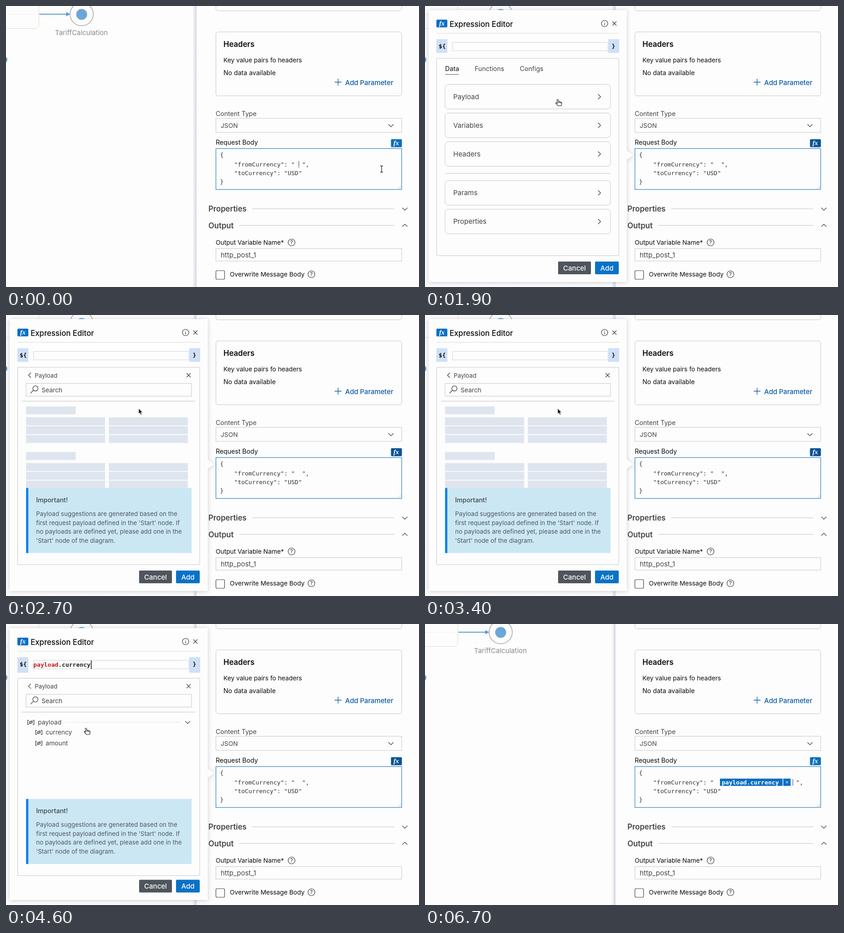
An HTML page that plays this animation: 906 by 618 pixels, repeating every 6.8 s.

```html
<!DOCTYPE html>
<html lang="en">
<head>
<meta charset="utf-8">
<title>Expression editor</title>
<style>
html, body { margin: 0; width: 100%; height: 100%; overflow: hidden; background: #fdfdfd; }
svg { display: block; }
text { font: 13.75px Inter, sans-serif; fill: #0c0c0c; white-space: pre; }
.dim { fill: #444; }
.label { font-size: 14.1px; }
.h { font-size: 16.7px; font-weight: 600; }
.row { font-size: 15px; }
.btn { font-size: 15px; font-weight: 500; fill: #fff; text-anchor: middle; }
.note { font-size: 13.4px; fill: #50585e; }
.mono { font: 13px "DejaVu Sans Mono", monospace; fill: #333; }
.bold { font-weight: 700; }
.fx { font: italic bold 14.5px "Liberation Serif", serif; fill: #fff; text-anchor: middle; }
.q { font-size: 11.5px; text-anchor: middle; fill: #222; }
.box { fill: #fdfdfd; stroke: #c6c6c6; }
.line { stroke: #c0c0c0; fill: none; }
.icon { stroke: #3a3a3a; fill: none; stroke-width: 1.2; }
</style>
</head>
<body>
<svg id="stage" width="906" height="618" viewBox="0 0 906 618">
  <defs>
    <pattern id="dots" width="25" height="25" patternUnits="userSpaceOnUse"><circle cx="12" cy="14" r=".8" fill="#ececf3"/></pattern>
    <linearGradient id="edge"><stop offset="0" stop-color="#d4d4e4" stop-opacity="0"/><stop offset="1" stop-color="#d4d4e4"/></linearGradient>
    <filter id="shadow" x="-10%" y="-10%" width="120%" height="120%"><feDropShadow dx="0" dy="1" stdDeviation="5" flood-color="#446" flood-opacity=".28"/></filter>
    <path id="down" class="icon" d="M-5.5-2.7L0 2.7 5.5-2.7"/>
    <path id="right" class="icon" d="M-2.7-5.5L2.7 0-2.7 5.5"/>
    <path id="cross" class="icon" d="M-4.5-4.5L4.5 4.5M4.5-4.5L-4.5 4.5"/>
    <g id="help"><circle class="icon" r="7.5"/><text class="q" y="4.2">?</text></g>
    <g id="field"><path class="icon" d="M-4-4.5H-7V4.5H-4M4-4.5H7V4.5H4"/><ellipse class="icon" rx="4" ry="2.4" transform="rotate(-25)"/><path class="icon" d="M-2 2L2-2"/></g>
  </defs>

  <rect width="906" height="618" fill="#fdfdfd"/>
  <rect width="417" height="618" fill="url(#dots)"/>
  <rect x="-20" y="-20" width="92" height="69.5" rx="8" fill="#fdfdfd" stroke="#e2dec0"/>
  <path d="M0 18H72" stroke="#f0f0f4"/>
  <path d="M73 18H134" stroke="#5b9bd5" stroke-width="2.2"/>
  <path d="M132 13.5L141.5 18 132 22.5Z" fill="#5b9bd5"/>
  <circle cx="166" cy="18" r="25.5" fill="#fdfdfd" stroke="#aaa" stroke-width="1.6"/>
  <circle cx="166" cy="18.5" r="12" fill="#6ca6d8"/>
  <text class="row" x="165.5" y="64" text-anchor="middle" style="fill:#8a8a8a">TariffCalculation</text>
  <circle cx="-5" cy="118" r="8" fill="#5b9bd5"/>

  <rect x="409" width="9" height="618" fill="url(#edge)"/>
  <rect x="418" width="488" height="618" fill="#fdfdfd"/>
  <rect class="box" x="460.5" y="-20" width="407.5" height="30.5" rx="5"/>
  <rect class="box" x="460.5" y="57" width="407.5" height="140.5" rx="5"/>
  <text class="h" x="477" y="90">Headers</text>
  <text x="477" y="123.5">Key value pairs fo headers</text>
  <text class="label" x="477" y="151.5">No data available</text>
  <path d="M721 167.5H736M728.5 160V175" stroke="#0a5ba5" stroke-width="1.3"/>
  <text x="744" y="173.5" style="font-size:14.8px;font-weight:500;fill:#0a5ba5">Add Parameter</text>

  <text class="label dim" x="460" y="241.5">Content Type</text>
  <rect class="box" x="460.5" y="247" width="407.5" height="31"/>
  <text class="dim" x="471" y="268">JSON</text>
  <use href="#down" x="844.5" y="263"/>
  <text class="label" x="460" y="305">Request Body</text>
  <rect id="fxButton" x="844.5" y="293" width="24" height="17.5" rx="2"/>
  <text class="fx" x="856" y="306">fx</text>
  <rect x="460.5" y="313.5" width="407.5" height="90" fill="#fdfdfd" stroke="#3a88c4" stroke-width="1.3"/>
  <path class="line" d="M860 402L867 395M864 402L867 399"/>
  <text class="mono" x="469.5" y="332">{</text>
  <text class="mono" x="500.5" y="352.5">"fromCurrency": "</text>
  <text class="mono" id="tail" y="352.5">",</text>
  <text class="mono" x="500.5" y="371.5">"toCurrency": "USD"</text>
  <text class="mono" x="469.5" y="391">}</text>
  <g id="chip">
    <path d="M647 340H784.5V356H647ZM786 340H802V356H786Z" fill="#0a6fc2"/>
    <text class="mono bold" x="651" y="352.5" style="fill:#fff">payload.currency</text>
    <path d="M791.5 345.5L796.5 350.5M796.5 345.5L791.5 350.5" stroke="#fff"/>
  </g>
  <path id="caret" d="M0 341V355.5" stroke="#444"/>

  <text class="h" x="444" y="452" style="fill:#444">Properties</text>
  <path class="line" d="M540 446H852M511 482.5H852"/>
  <use href="#down" x="875" y="446.5"/>
  <text class="h" x="444" y="489" style="fill:#444">Output</text>
  <use href="#down" transform="translate(875 482.5) scale(1 -1)"/>
  <text x="460" y="525">Output Variable Name*</text>
  <use href="#help" x="626.5" y="520"/>
  <rect class="box" x="460.5" y="533.5" width="407.5" height="27.5"/>
  <text class="row dim" x="471" y="552.5">http_post_1</text>
  <rect x="460.5" y="582" width="19" height="19" rx="2.5" fill="#fdfdfd" stroke="#444" stroke-width="1.2"/>
  <text x="491" y="595">Overwrite Message Body</text>
  <use href="#help" x="670" y="590"/>

  <g id="popup">
    <path d="M8 9H442.5V318L457 328 442.5 338V607H8Z" fill="#fdfdfd" filter="url(#shadow)"/>
    <rect x="25" y="30" width="24" height="17" rx="2" fill="#0a6fc2"/>
    <text class="fx" x="37" y="43">fx</text>
    <text x="54" y="45.5" style="font-size:16.7px;font-weight:500">Expression Editor</text>
    <circle class="icon" cx="394" cy="38.5" r="7"/>
    <path class="icon" d="M394 37.5V42.5M394 34.5V36"/>
    <use href="#cross" x="415.5" y="38.5"/>
    <path class="line" d="M25 60H425" style="stroke:#d8d8d4"/>
    <rect x="60.5" y="80" width="341" height="18.5" fill="#fdfdfd" stroke="#e6e6ee" stroke-width="2"/>
    <path id="braces" fill="#cfe0f7"/>
    <text class="mono bold" x="30" y="93" style="fill:#111">${</text>
    <text class="mono bold" x="409.5" y="93" style="fill:#111">}</text>
    <g id="typed">
      <text class="mono bold" x="60" y="94"><tspan fill="#c01818">payload</tspan><tspan fill="#222">.currency</tspan></text>
      <path d="M187 80V99" stroke="#111" stroke-width="1.5"/>
    </g>
    <g id="body">
      <rect class="box" x="25.5" y="115" width="399.5" height="434" rx="1"/>
      <g id="menu">
        <text class="label" x="44" y="142.5" style="font-weight:500;fill:#333">Data</text>
        <path d="M44 150.5H74" stroke="#555"/>
        <text class="label dim" x="109" y="142.5">Functions</text>
        <text class="label dim" x="208" y="142.5">Configs</text>
        <path class="line" d="M44 368H407"/>
      </g>
      <g id="browser">
        <use href="#right" transform="translate(52 132.5) scale(-1 1)"/>
        <text class="dim" x="63" y="137.5" style="font-size:13.2px">Payload</text>
        <use href="#cross" x="400.5" y="132.5"/>
        <rect class="box" x="44" y="150.5" width="363" height="28"/>
        <path class="icon" d="M60 165.5L54 172"/><circle class="icon" cx="64.5" cy="161.5" r="5.7"/>
        <text class="dim" x="78" y="169.5">Search</text>
        <path class="line" d="M35 189.5H415"/>
        <g id="skeleton" fill="#dfe5ef"></g>
        <g id="tree">
          <use href="#field" x="54.5" y="212"/><use href="#field" x="72" y="234"/><use href="#field" x="72" y="258"/>
          <text class="dim" x="70" y="216.5">payload</text>
          <text class="dim" x="87" y="238.5">currency</text>
          <text class="dim" x="87" y="262.5">amount</text>
          <path d="M130 212H381" stroke="#e6e6dc"/>
          <use href="#down" x="398.5" y="212"/>
        </g>
        <rect x="44" y="380.5" width="363" height="143" fill="#cbe7f4"/>
        <rect x="44" y="380.5" width="5" height="143" fill="#0a82ea"/>
        <text class="label" x="66" y="411.5" style="font-weight:500;fill:#444">Important!</text>
        <g id="note"></g>
      </g>
    </g>
    <g id="buttons">
      <rect x="292" y="562" width="72" height="28" rx="2" fill="#4f555c"/><text class="btn" x="328" y="581.5">Cancel</text>
      <rect id="add" x="373" y="562" width="52" height="28" rx="2"/><text class="btn" x="399" y="581.5">Add</text>
    </g>
  </g>

  <g id="cursor">
    <path id="beam" d="M-3-7Q0-7 0-5V5Q0 7-3 7M3-7Q0-7 0-5M0 5Q0 7 3 7" fill="none" stroke="#222" stroke-width="1.3"/>
    <path id="arrow" d="M0 0V12L2.8 9.5 4.8 14 6.9 13 5 8.8H8.5Z" fill="#111" stroke="#fff" stroke-width=".8"/>
    <path id="hand" d="M-1.5 1Q0-1 1.2 1L2 5Q4 4 4.6 5.5 6.5 5 7 6.5 9 6 9 8.5L8 14H1L-4 8.5Q-4.5 6.500-2 7.500L-.5 8.5ZM2 5V8M4.600 5.500V8M7 6.500V8.500" fill="#fff" stroke="#222" stroke-width="1.2"/>
  </g>
</svg>
<script>
const el = id => document.getElementById(id);
const show = (id, on) => el(id).setAttribute('display', on ? 'inline' : 'none');
const set = (id, name, value) => el(id).setAttribute(name, value);
const add = (id, markup) => el(id).insertAdjacentHTML('beforeend', markup);

const rows = { Payload: 172.5, Variables: 235.5, Headers: 298.5, Params: 384, Properties: 447 };
for (const [name, y] of Object.entries(rows))
  add('menu', `<rect class="box" x="44" y="${y}" width="363" height="54" rx="7"/>
    <text class="row dim" x="62" y="${y + 32}">${name}</text><use href="#right" x="382.5" y="${y + 27}"/>`);

for (const y of [201, 301.5]) {
  add('skeleton', `<rect x="44" y="${y}" width="109" height="17.5"/>`);
  for (let i = 0; i < 6; i++)
    add('skeleton', `<rect x="${i % 2 ? 225.5 : 44}" y="${y + 24 + (i >> 1) * 19.4}" width="173.5" height="17.7"/>`);
}

["Payload suggestions are generated based on the", "first request payload defined in the 'Start' node. If",
 "no payloads are defined yet, please add one in the", "'Start' node of the diagram."]
  .forEach((s, i) => add('note', `<text class="note" x="66" y="${442 + i * 19.6}">${s}</text>`));

const LOOP = 6800, OPEN = 800, LOAD = 2200, SKELETON = 2700, TREE = 3500, INSERT = 4300, CLOSE = 5900;
const path = [[0, 824, 358.5], [200, 824, 358.5], [600, 859, 309], [1200, 859, 309], [1800, 291, 205.5],
  [3600, 291, 205.5], [4000, 175.5, 229], [4800, 175.5, 229], [5400, 398.5, 577], [LOOP, 398.5, 577]];

function cursorAt(t) {
  const i = path.findIndex(p => p[0] > t);
  const [t0, x0, y0] = path[i - 1], [t1, x1, y1] = path[i];
  const k = (t - t0) / (t1 - t0), e = k * k * (3 - 2 * k);
  return [x0 + (x1 - x0) * e, y0 + (y1 - y0) * e];
}

function draw(t) {
  const open = t >= OPEN && t < CLOSE, done = t >= CLOSE;
  const loaded = t >= LOAD, inserted = t >= INSERT, shift = inserted ? 4.3 : 0;
  const [x, y] = cursorAt(t);
  const onFx = x > 843 && y < 312, onRow = !loaded && x < 407 && y > 172 && y < 227;
  const onItem = t >= TREE && x < 230 && y < 245, onAdd = y > 560 && x > 372;
  const hand = onFx || onRow || onItem || onAdd;
  const beam = !open && !hand;

  show('popup', open);
  show('typed', inserted);
  show('menu', !loaded);
  show('browser', loaded);
  show('skeleton', t >= SKELETON && t < TREE);
  show('tree', t >= TREE);
  set('body', 'transform', `translate(0 ${shift})`);
  set('buttons', 'transform', `translate(0 ${shift && .5})`);
  set('braces', 'd', [25, 402].map(left => `M${left} 73h24v${30 + shift}h-24z`).join(''));
  set('add', 'fill', onAdd ? '#0056a0' : '#0a72c6');
  set('fxButton', 'fill', open || (onFx && !done) ? '#0a5296' : '#0a6fbd');

  show('chip', done);
  show('caret', !open);
  set('caret', 'transform', `translate(${done ? 807 : 642.5} 0)`);
  set('tail', 'x', done ? 814 : 649.5);

  show('cursor', !done);
  set('cursor', 'transform', `translate(${x} ${y})`);
  show('beam', beam);
  show('hand', hand);
  show('arrow', !beam && !hand);
}

function tick() {
  draw(Math.floor(performance.now() % LOOP / 100) * 100);
  requestAnimationFrame(tick);
}
tick();
</script>
</body>
</html>
```
